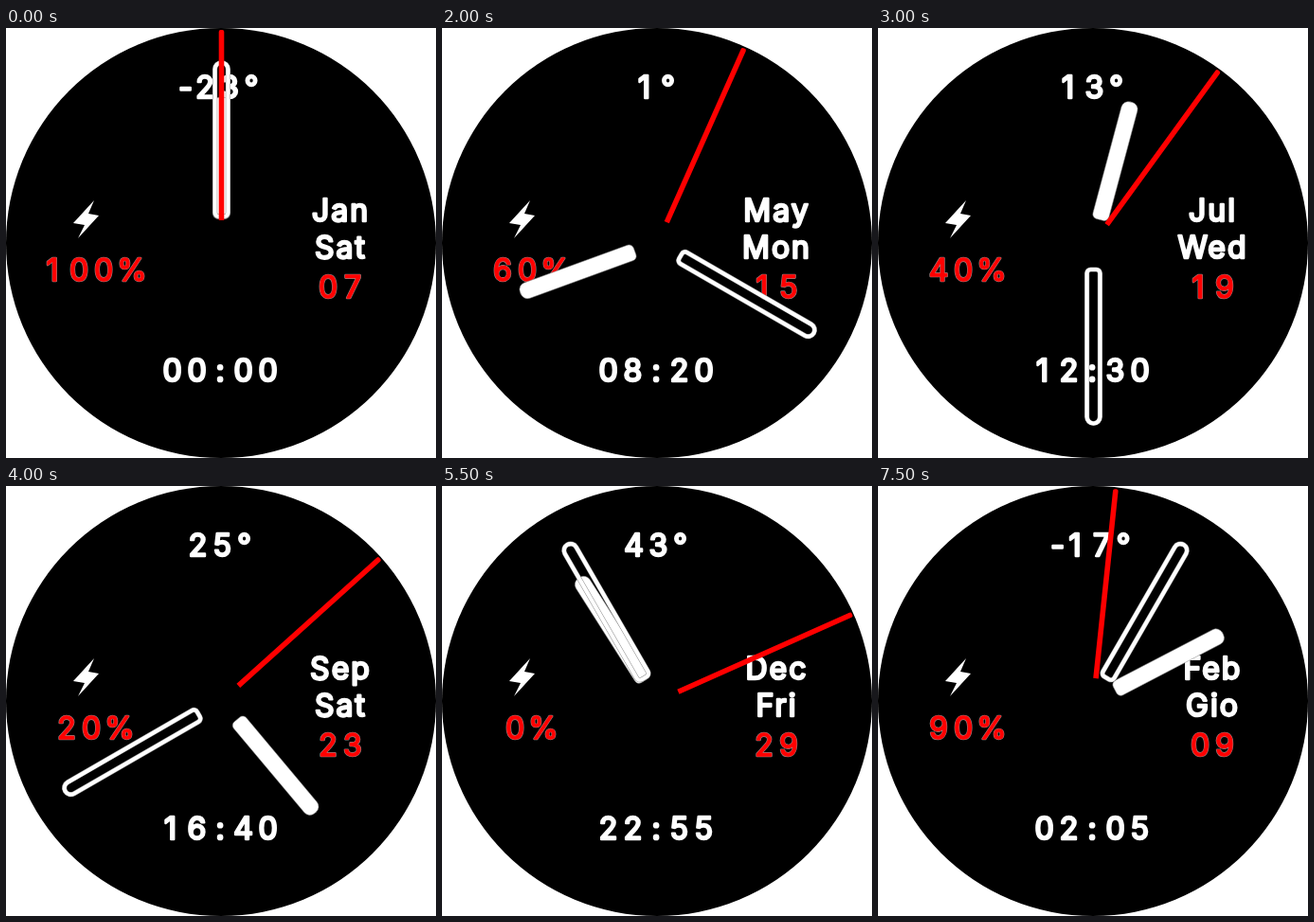
Animation, 454 px wide and 454 px high, one loop 8000 ms. Source, as an HTML page with a canvas:

```html
<!DOCTYPE html>
<html lang="en">
<head>
<meta charset="utf-8">
<title>Watch face</title>
<style>
  html, body { margin: 0; width: 100%; height: 100%; overflow: hidden; background: #fff; }
  canvas { display: block; }
</style>
</head>
<body>
<canvas id="face" width="454" height="454"></canvas>
<script>
const ctx = document.getElementById('face').getContext('2d');
const STEP = 500, STEPS = 16, C = 227;
const WHITE = '#fff', RED = '#f00', EDGE = '#8c8c8c';

const english = {
  months: 'Jan Feb Mar Apr May Jun Jul Aug Sep Oct Nov Dec'.split(' '),
  days: 'Sun Mon Tue Wed Thu Fri Sat'.split(' ')
};
const italian = {
  months: 'Gen Feb Mar Apr Mag Giu Lug Ago Set Ott Nov Dic'.split(' '),
  days: 'Dom Lun Mar Mer Gio Ven Sab'.split(' ')
};

const pad = n => String(n).padStart(2, '0');

// A thick round stroke gives the letters their soft corners.
function glyphs(text, x, y, color) {
  const isRed = color === RED;
  if (isRed) {
    ctx.strokeStyle = '#9a8080';
    ctx.lineWidth = 2.6;
    ctx.strokeText(text, x, y);
  }
  ctx.strokeStyle = ctx.fillStyle = color;
  ctx.lineWidth = isRed ? 1.4 : 2.5;
  ctx.strokeText(text, x, y);
  ctx.fillText(text, x, y);
}

function word(text, y) {
  ctx.letterSpacing = '2px';
  glyphs(text, 353.5, y, WHITE);
  ctx.letterSpacing = '0px';
}

const cells = { ':': 23, '%': 34, '°': 20, '-': 15 };
const cell = c => cells[c] || 26;

function number(text, x, y, color) {
  const chars = [...text];
  x -= chars.reduce((sum, c) => sum + cell(c), 0) / 2;
  for (const c of chars) {
    glyphs(c, x + cell(c) / 2 - (c === '1' ? 2 : 0), y, color);
    x += cell(c);
  }
}

function bolt() {
  ctx.fillStyle = WHITE;
  ctx.beginPath();
  for (const [x, y] of [[93, 182], [71, 206], [83, 208], [76, 222], [98, 198], [87, 196]]) ctx.lineTo(x, y);
  ctx.fill();
}

function hand(degrees, draw) {
  ctx.save();
  ctx.translate(C + 0.5, C);
  ctx.rotate(degrees * Math.PI / 180);
  ctx.beginPath();
  draw();
  ctx.restore();
}

function hourHand() {
  ctx.roundRect(-8.7, -154, 17.4, 128.5, [7.5, 7.5, 5, 5]);
  ctx.fillStyle = WHITE;
  ctx.fill();
  ctx.strokeStyle = EDGE;
  ctx.lineWidth = 0.5;
  ctx.stroke();
}

function minuteHand() {
  ctx.roundRect(-6.9, -190.5, 13.8, 162.5, [6.9, 6.9, 4, 4]);
  ctx.strokeStyle = EDGE;
  ctx.lineWidth = 5.2;
  ctx.stroke();
  ctx.strokeStyle = WHITE;
  ctx.lineWidth = 4.2;
  ctx.stroke();
}

function secondHand() {
  ctx.roundRect(-2.8, -225, 5.6, 201, [2, 2, 0, 0]);
  ctx.fillStyle = RED;
  ctx.fill();
}

function render(step) {
  // Twelve steps of a year, a pause without seconds, then the next language.
  const k = step < 12 ? step : [11, 0, 0, 1][step - 12];
  const showSeconds = step < 12 || step > 13;
  const { months, days } = step > 13 ? italian : english;
  const hour = 2 * k, minute = 5 * k, date = 7 + 2 * k;

  ctx.clearRect(0, 0, 454, 454);
  ctx.fillStyle = '#000';
  ctx.beginPath();
  ctx.arc(C, C, C, 0, 7);
  ctx.fill();

  ctx.font = '400 32px Inter, "Liberation Sans", sans-serif';
  ctx.textAlign = 'center';
  ctx.lineJoin = ctx.lineCap = 'round';
  number(6 * k - 23 + '°', 225.5, 74, WHITE);
  number(Math.max(0, 100 - 10 * k) + '%', 94, 267, RED);
  number(pad(date), 353, 285, RED);
  number(pad(hour) + ':' + pad(minute), 226, 373, WHITE);
  word(months[k], 204);
  word(days[new Date(2023, k, date).getDay()], 243);
  bolt();

  hand(hour * 30 + minute / 2, hourHand);
  hand(minute * 6, minuteHand);
  if (showSeconds) hand(k * 6, secondHand);
}

const start = performance.now();
function tick() {
  render(Math.floor((performance.now() - start) / STEP) % STEPS);
  requestAnimationFrame(tick);
}
tick();
</script>
</body>
</html>
```
